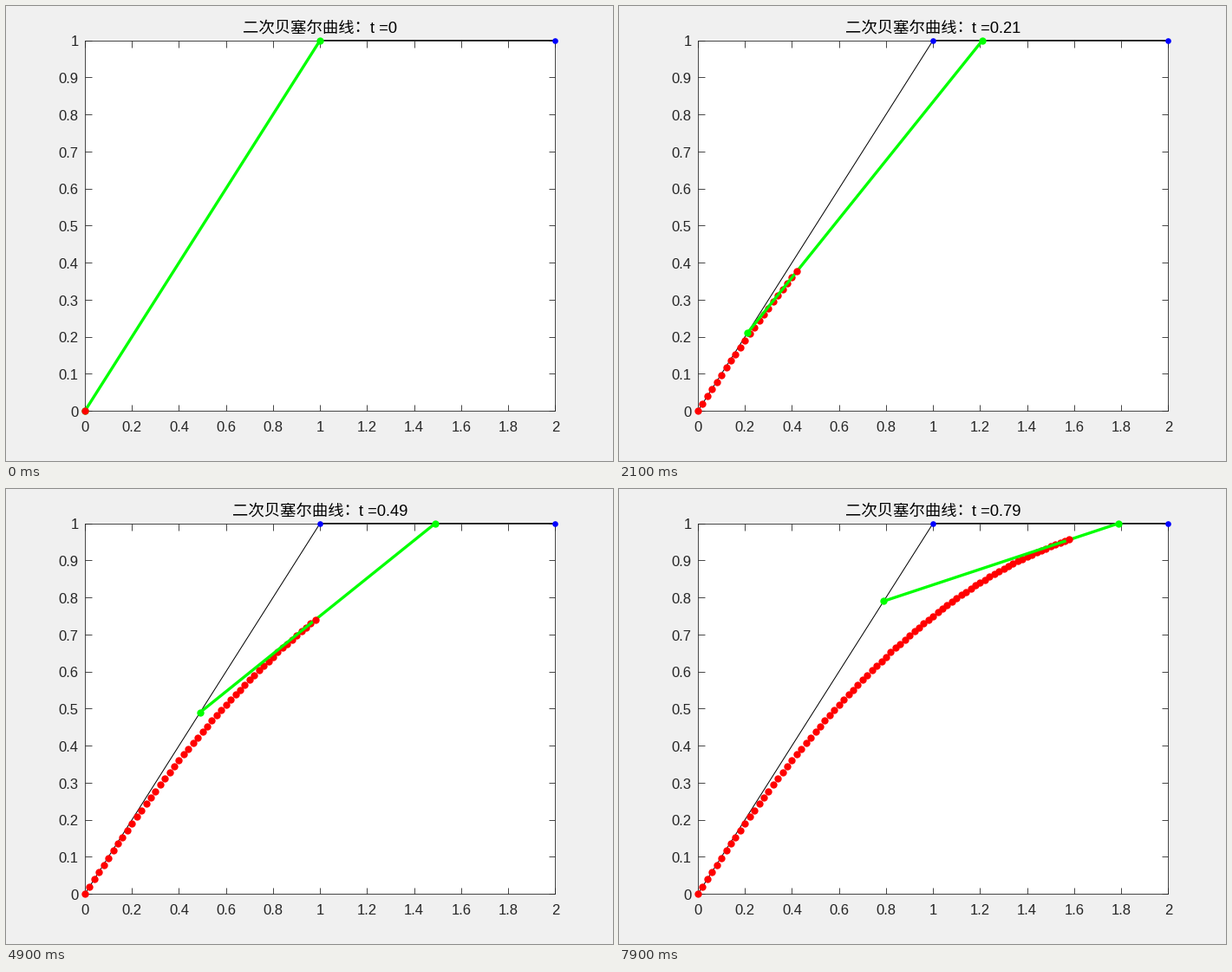
Recreate the animation shown at these times as a matplotlib script. Size 700 px wide and 525 px high, loop 8000 ms.

```python
import numpy as np
import matplotlib.pyplot as plt
from matplotlib.animation import FuncAnimation

W, H, DPI = 700, 525, 100
PT = 1.2                    # one 120-dpi point, in points of this figure
FRAMES, INTERVAL = 80, 100
LEFT, RIGHT, BOTTOM, TOP = 91, 633.4, 57.75, 485.4
INK = (0.15,) * 3
GREEN = (0, 1, 0)
LATIN, CJK = "Liberation Sans", "Noto Sans CJK JP"
EM = 11 * PT * DPI / 72     # title size in pixels
MID = (LEFT + RIGHT) / 2

P = np.array([[0, 0], [1, 1], [2, 1]], float)


def label(x, y, s, size=10, family=LATIN, **kw):
    """Text with its baseline at pixel (x, y), measured from the top left."""
    return fig.text(x / W, 1 - y / H, s, fontsize=size * PT, family=family,
                    va="baseline", **kw)


def dots(size, color, z, **kw):
    return ax.plot([], [], "o", ms=size * PT, mew=0, color=color,
                   clip_on=False, zorder=z, **kw)[0]


def bezier(t):
    t = np.asarray(t)[:, None]
    return (1 - t) ** 2 * P[0] + 2 * t * (1 - t) * P[1] + t ** 2 * P[2]


fig = plt.figure(figsize=(W / DPI, H / DPI), dpi=DPI, facecolor=(0.94,) * 3)
ax = fig.add_axes([LEFT / W, BOTTOM / H, (RIGHT - LEFT) / W, (TOP - BOTTOM) / H])
ax.set(xlim=(0, 2), ylim=(0, 1),
       xticks=np.linspace(0, 2, 11), yticks=np.linspace(0, 1, 11))
ax.tick_params(direction="in", top=True, right=True, length=4.5 * PT * 0.72 / 0.72,
               width=0.5 * PT, color=INK, labelbottom=False, labelleft=False)
for spine in ax.spines.values():
    spine.set(linewidth=0.5 * PT, edgecolor=INK)

for k in range(11):
    f = k / 10
    label(LEFT + f * (RIGHT - LEFT), 491, f"{2 * f:g}", color=INK, ha="center")
    label(83.5, H - BOTTOM - f * (TOP - BOTTOM) + 6.7, f"{f:g}", color=INK, ha="right")

ax.plot(*P.T, color="black", lw=0.6 * PT, zorder=3, clip_on=False, snap=False)
dots(4, "blue", 4).set_data(*P[1:].T)
trail = dots(5, "red", 5)
bar = dots(5, GREEN, 6, ls="-", lw=2 * PT)
head = dots(5, "red", 7)

name = label(0, 31, "二次贝塞尔曲线", 11, CJK, color="black")
colon = label(0, 31, "：", 11, CJK, color="black")
value = label(0, 31, "", 11, color="black")


def set_title(t):
    num = f"{t:g}"
    digits = sum(c.isdigit() for c in num)
    width = EM * (9.14 + 0.556 * digits + 0.278 * num.count("."))
    x = MID - width / 2
    name.set_x(x / W)
    colon.set_x((x + 6.73 * EM) / W)
    value.set_x((x + 8 * EM) / W)
    value.set_text(f"t ={num}")


def draw(i):
    t = i / 100
    curve = bezier(np.arange(i + 1) / 100)
    ends = P[:2] + t * np.diff(P, axis=0)
    trail.set_data(*curve[:-1].T)
    head.set_data(*curve[-1:].T)
    bar.set_data(*ends.T)
    set_title(t)
    return trail, bar, head, name, colon, value


anim = FuncAnimation(fig, draw, frames=FRAMES, interval=INTERVAL,
                     repeat=True, repeat_delay=0, blit=False)
plt.show()
```
